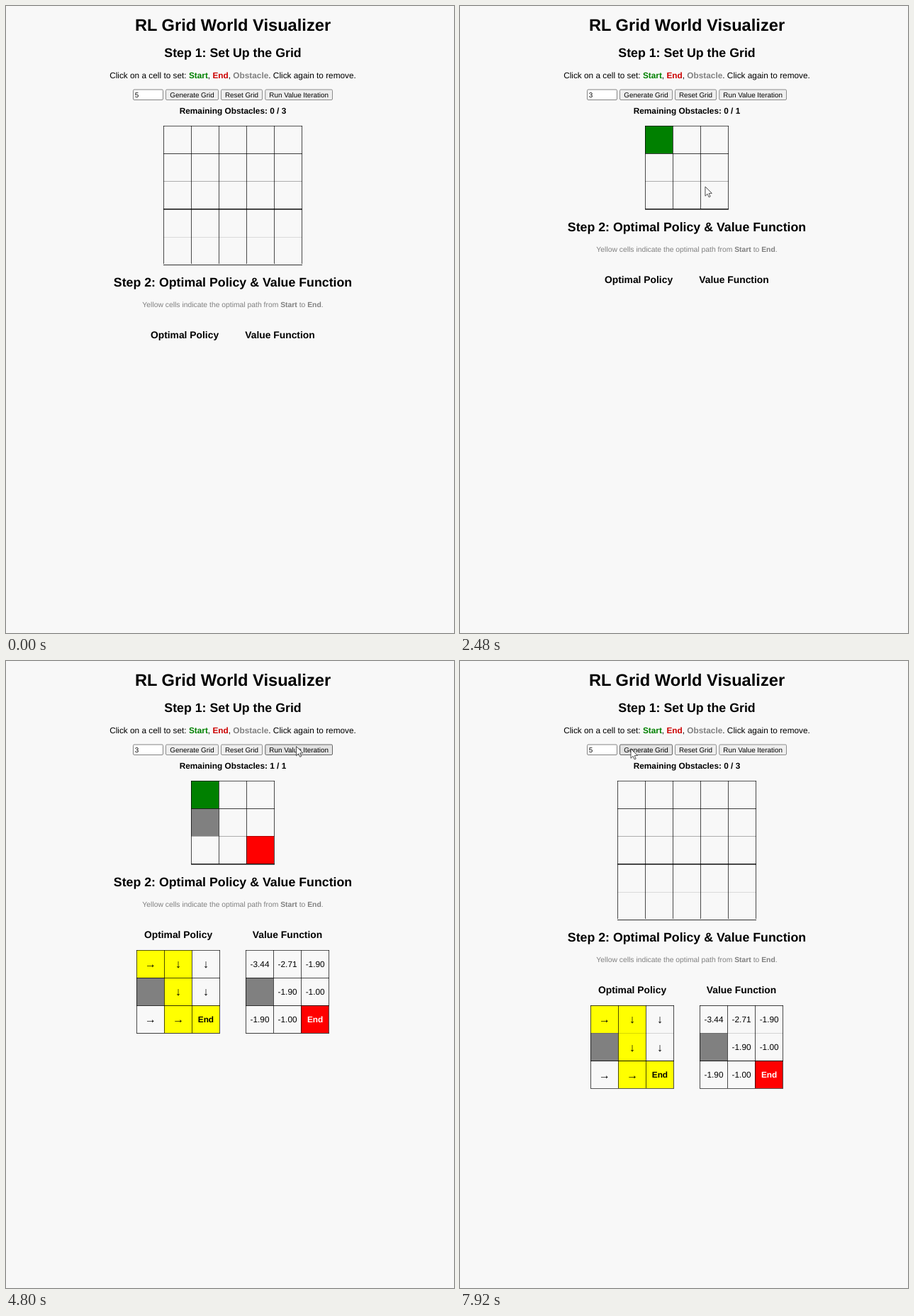
An HTML page with a canvas for the animation above (8000 ms loop, 632x885 px).

```html
<!DOCTYPE html>
<html lang="en">
<head>
<meta charset="utf-8">
<title>RL Grid World Visualizer</title>
<style>
  html, body { margin: 0; width: 100%; height: 100%; overflow: hidden; background: #f8f8f8; }
  canvas { display: block; width: 632px; height: 885px; }
</style>
</head>
<body>
<canvas id="stage" width="632" height="885"></canvas>
<script>
const ctx = document.getElementById('stage').getContext('2d');
const LOOP = 8000, STEP = 80;
const MID = 320, TOP = 169.3, CELL = 39.05;
const FILL = { S: '#008000', E: '#ff0000', O: '#808080' };

// Line strength per row: the page is scaled down, so some rules come out faint.
const GRID_LINES = [.65, .75, .3, .95, .12, .8];
const RESULT_LINES = { 3: [.65, .7, .8, .75], 4: [.65, .8, .1, .9], 5: [.75, .15, .9, .65] };

const AROUND_CENTRE = {
  policy: ['↓', '→', '↓', '↓', '', '↓', '→', '→', 'End'],
  values: ['-3.44', '-2.71', '-1.90', '-2.71', '', '-1.00', '-1.90', '-1.00', 'End'],
  path: [0, 3, 6, 7, 8], wall: 4
};
const AROUND_LEFT = {
  policy: ['→', '↓', '↓', '', '↓', '↓', '→', '→', 'End'],
  values: ['-3.44', '-2.71', '-1.90', '', '-1.90', '-1.00', '-1.90', '-1.00', 'End'],
  path: [0, 1, 4, 7, 8], wall: 3
};

const events = [
  [0, { n: 5, input: 5, cells: '', result: null }],
  [800, { input: 4 }],
  [960, { input: 3 }],
  [1680, { n: 3, cells: '' }],
  [2240, { cells: 'S' }],
  [2640, { cells: 'S.......E' }],
  [3040, { cells: 'S...O...E' }],
  [3600, { result: AROUND_CENTRE }],
  [4160, { cells: 'S.......E' }],
  [4320, { cells: 'S..O....E' }],
  [4720, { result: AROUND_LEFT }],
  [5760, { input: 4 }],
  [6560, { n: 4, cells: '' }],
  [7120, { input: 5 }],
  [7840, { n: 5 }]
];
const presses = [1600, 3520, 4640, 6480, 7760];

// Pointer stops: arrival, departure, x, y
const stops = [
  [400, 400, 340, 160],
  [640, 1120, 217, 122],
  [1520, 1680, 243.5, 127.5],
  [2080, 2240, 281, 190],
  [2560, 2720, 358, 267],
  [2960, 3040, 320, 228],
  [3440, 3840, 429, 124],
  [4080, 4160, 320, 228],
  [4320, 4400, 281, 228],
  [4640, 4880, 409.5, 120.5],
  [5440, 5600, 215.5, 116.5],
  [5680, 5920, 217, 122],
  [6320, 6560, 240, 126],
  [6800, 6800, 227, 137],
  [7040, 7280, 217, 121],
  [7600, 8000, 241, 124]
];

const buttons = [
  ['Generate Grid', 225, 75],
  ['Reset Grid', 303, 59],
  ['Run Value Iteration', 365.3, 95.7]
];

function stateAt(t) {
  return Object.assign({}, ...events.filter(e => e[0] <= t).map(e => e[1]));
}

function pointerAt(t) {
  if (t < stops[0][0]) return null;
  const i = stops.findLastIndex(s => s[0] <= t);
  const [, leave, x, y] = stops[i], next = stops[i + 1];
  if (t <= leave || !next) return { x, y };
  const p = (t - leave) / (next[0] - leave);
  const k = p * p * (3 - 2 * p);
  return { x: x + (next[2] - x) * k, y: y + (next[3] - y) * k };
}

function setFont(size, bold) {
  ctx.font = `${bold ? 'bold ' : ''}${size}px "Liberation Sans", Arial, sans-serif`;
}

function text(str, x, y, size, bold, color = '#000', align = 'center') {
  setFont(size, bold);
  ctx.textAlign = align;
  ctx.fillStyle = color;
  ctx.fillText(str, x, y);
}

// Runs are [text, color, bold], centred as one line.
function richText(runs, y, size) {
  const widths = runs.map(([str, , bold]) => {
    setFont(size, bold);
    return ctx.measureText(str).width;
  });
  let x = MID - widths.reduce((a, b) => a + b, 0) / 2;
  runs.forEach(([str, color, bold], i) => {
    text(str, x, y, size, bold, color, 'left');
    x += widths[i];
  });
}

function box(x, y, w, h, fill, stroke) {
  ctx.beginPath();
  ctx.roundRect(x + .5, y + .5, w - 1, h - 1, 1.5);
  ctx.fillStyle = fill;
  ctx.fill();
  ctx.lineWidth = .9;
  ctx.strokeStyle = stroke;
  ctx.stroke();
}

function table(x, y, n, lines, fillOf, drawLabel) {
  for (let i = 0; i < n * n; i++) {
    const cx = x + (i % n) * CELL, cy = y + Math.floor(i / n) * CELL;
    const fill = fillOf(i);
    if (fill) {
      ctx.fillStyle = fill;
      ctx.fillRect(Math.round(cx), Math.round(cy), 39, 39);
    }
    if (drawLabel) drawLabel(i, cx + CELL / 2 + .3, cy + CELL / 2 + 4.2);
  }
  const size = Math.round(n * CELL);
  for (let i = 0; i <= n; i++) {
    ctx.fillStyle = 'rgba(0,0,0,.7)';
    ctx.fillRect(Math.round(x + i * CELL), Math.round(y), 1, size);
    ctx.fillStyle = `rgba(0,0,0,${lines[i]})`;
    ctx.fillRect(Math.round(x), Math.round(y + i * CELL), size + 1, lines[i] > .9 ? 1.5 : 1);
  }
}

function drawControls(input, pointer, pressed) {
  box(179, 117.5, 43, 15.5, '#fff', '#767676');
  text(input, 181.7, 128.7, 9.87, false, '#000', 'left');
  for (const [label, x, w] of buttons) {
    const over = pointer && pointer.x >= x && pointer.x <= x + w && pointer.y >= 118 && pointer.y <= 133;
    const fill = !over ? '#efefef' : pressed ? '#f5f5f5' : '#e3e3e3';
    box(x, 117.5, w, 15.5, fill, over && !pressed ? '#555' : '#808080');
    text(label, x + w / 2, 128.7, 9.87);
  }
}

function drawResults(n, result, bottom) {
  const [left, right] = result ? [243, 397] : [252, 386.5];
  text('Optimal Policy', left, bottom + 104.2, 13.85, true);
  text('Value Function', right, bottom + 104.2, 13.85, true);
  if (!result) return;

  const y = bottom + 121.6, lines = RESULT_LINES[n];
  const { policy, values, path, wall } = result;
  const labeller = (labels, endColor) => (i, x, by) => {
    const label = labels[i];
    if (label === 'End') text(label, x, by, 11.84, true, endColor);
    else if (label.length === 1) text(label, x, by + 1.6, 16);
    else text(label, x, by, 11.84);
  };
  table(184, y, 3, lines,
    i => i === wall ? FILL.O : path.includes(i) ? '#ffff00' : null, labeller(policy, '#000'));
  table(338.2, y, 3, lines,
    i => i === wall ? FILL.O : i === 8 ? FILL.E : null, labeller(values, '#fff'));
}

function drawPointer({ x, y }) {
  ctx.save();
  ctx.translate(x, y);
  ctx.scale(.78, .78);
  ctx.beginPath();
  [[0, 0], [0, 17], [4, 13.2], [6.6, 19], [9.2, 18], [6.7, 12.1], [12, 12]]
    .forEach(([px, py]) => ctx.lineTo(px, py));
  ctx.closePath();
  ctx.fillStyle = '#fff';
  ctx.fill();
  ctx.lineWidth = 1.2;
  ctx.strokeStyle = '#444';
  ctx.stroke();
  ctx.restore();
}

function draw(t) {
  const { n, input, cells, result } = stateAt(t);
  const pointer = pointerAt(t);
  const pressed = presses.some(p => t >= p && t < p + STEP);
  const bottom = TOP + n * CELL;
  const grey = '#808080';

  ctx.textRendering = 'geometricPrecision';
  ctx.fillStyle = '#f8f8f8';
  ctx.fillRect(0, 0, 632, 885);

  text('RL Grid World Visualizer', MID, 35, 23.68, true);
  text('Step 1: Set Up the Grid', MID, 72.3, 17.76, true);
  richText([
    ['Click on a cell to set: ', '#000'], ['Start', '#008000', true], [', ', '#000'],
    ['End', '#cc0000', true], [', ', '#000'], ['Obstacle', grey, true],
    ['. Click again to remove.', '#000']
  ], 102.4, 11.84);

  drawControls(input, pointer, pressed);
  const placed = cells.includes('O') ? 1 : 0;
  text(`Remaining Obstacles: ${placed} / ${n - 2}`, MID, 151.5, 11.84, true);

  table(MID - n * CELL / 2 - .37, TOP, n, GRID_LINES, i => FILL[cells[i]]);

  text('Step 2: Optimal Policy & Value Function', MID, bottom + 31.9, 17.76, true);
  richText([
    ['Yellow cells indicate the optimal path from ', grey], ['Start', grey, true],
    [' to ', grey], ['End', grey, true], ['.', grey]
  ], bottom + 60.6, 10.36);
  drawResults(n, result, bottom);

  if (pointer) drawPointer(pointer);
}

function tick() {
  const t = performance.now() % LOOP;
  draw(Math.floor(t / STEP) * STEP);
  requestAnimationFrame(tick);
}
tick();
</script>
</body>
</html>
```
